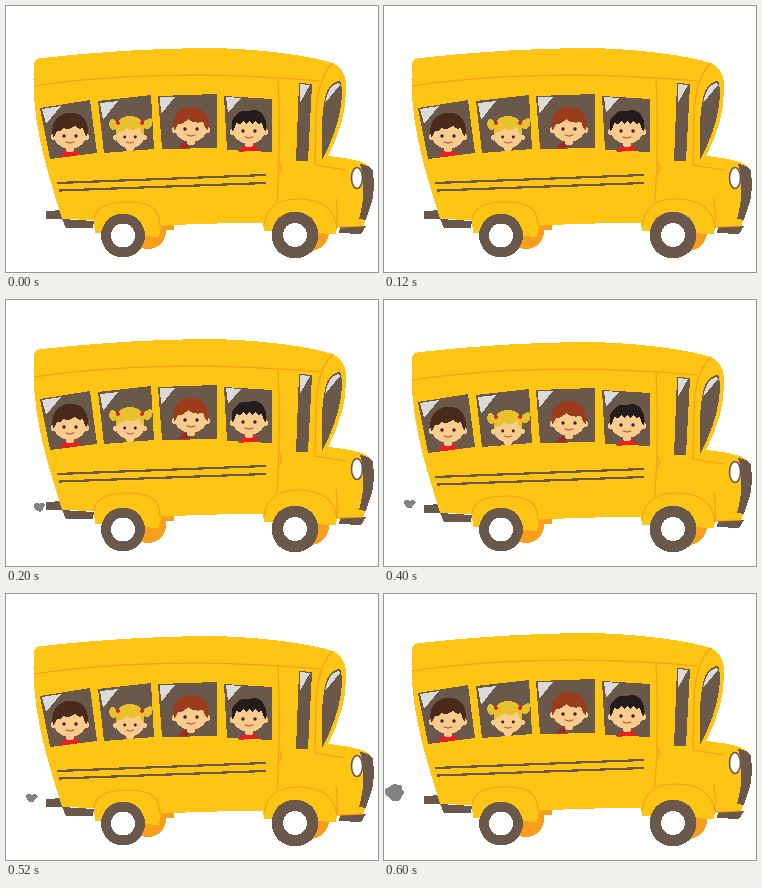
An HTML page without scripts that plays this animation: 372x266 px, repeating every 800 ms.

```html
<!DOCTYPE html>
<html lang="en">
<head>
<meta charset="utf-8">
<title>School bus</title>
<style>
html, body { margin: 0; width: 100%; height: 100%; overflow: hidden; background: #fff; }
svg { display: block; width: 100%; height: 100%; shape-rendering: crispEdges; }
.bus { animation: bounce 400ms step-end infinite; }
.puff { opacity: 0; fill: #808283; animation: puff 800ms step-end infinite; }
.p2 { animation-delay: 200ms; }
.p3 { animation-delay: 400ms; }
@keyframes bounce { 50% { transform: translateY(-3px); } }
@keyframes puff { 25% { opacity: 1; } 50% { opacity: 0; } }
.yellow { fill: #ffc515; }
.orange { fill: #f99d1c; }
.dark { fill: #6a584a; }
.glint { fill: #dadad8; }
.line { fill: none; stroke: #f99d1c; stroke-width: 1.2; }
.stripe { fill: none; stroke: #6a584a; stroke-width: 2.2; }
.skin { fill: #f9cb8c; }
.shirt { fill: #ee1c25; }
.blond { fill: #e8c22c; }
.mouth { fill: none; stroke: #a9412c; stroke-width: 1; stroke-linecap: round; }
.smooth { shape-rendering: geometricPrecision; }
</style>
</head>
<body>
<svg viewBox="0 0 372 266">
  <defs>
    <path id="shirt" class="shirt" d="M-10 22Q-8 16-3 15H4Q8 16 10 20Z"/>
    <g id="kid">
      <path class="skin" d="M-4 10H4V16Q0 19-4 16Z"/>
      <circle class="skin" cx="-16" cy="2" r="3.2"/>
      <circle class="skin" cx="16" cy="2" r="3.2"/>
      <ellipse class="skin" rx="16" ry="14"/>
      <g class="smooth" fill="#38231a">
        <circle cx="-6" cy="1" r="1.7"/>
        <circle cx="6" cy="1" r="1.7"/>
      </g>
      <path class="mouth smooth" d="M-4 7Q0 9.500 4 7"/>
    </g>
  </defs>

  <path class="puff" d="M28 204Q31 201 33 204Q36 201 39 204Q39 208 34 212Q27 210 28 204Z"/>
  <path class="puff p2" d="M20 201Q23 199 26 201Q30 199 32 202Q31 205 29 205Q28 209 24 208Q20 206 20 201Z"/>
  <path class="puff p3" d="M1 198Q1 193 6 193Q9 188 14 191Q18 190 18 195Q22 198 18 202Q16 208 11 207Q6 207 5 203Q1 202 1 198Z"/>

  <circle class="orange" cx="142" cy="225" r="18"/>
  <circle class="orange" cx="304" cy="226" r="19"/>

  <g class="bus">
    <path class="dark" d="M40 205L57 204V213L40 213Z"/>
    <path class="orange" d="M150 217H168V224H150Z"/>
    <path class="yellow" d="M28 58Q29 52 36 52C90 46 150 42 205 42C255 43 300 49 327 57Q338 62 340 76C341 103 335 125 322 150Q352 153 362 159Q368 168 367 183Q364 200 357 221H331L330 228L258 225L257 217Q210 217 168 219L155 220L153 231L89 227L88 214L56 213C45 175 24 120 28 58Z"/>
    <path class="dark" d="M56 213L88 215L87 222L60 222Z"/>
    <path class="dark" d="M334 221L360 220L355 228L333 227Z"/>
    <path class="dark" d="M354 158Q364 159 367 165Q369 185 366 195L360 214L353 213Q358 195 357 180Q358 168 354 158Z"/>
    <ellipse class="smooth" cx="351" cy="172" rx="5.500" ry="10.500" fill="#fff" stroke="#6a584a" stroke-width="1.600"/>

    <g class="smooth">
      <path class="line" d="M28 80C110 68 210 66 314 75M272 73Q275 130 271 196"/>
      <path class="line" d="M327 57Q311 72 310 110L309 159L340 164M273 156Q278 162 273 168"/>
      <path class="line" d="M88 214C89 201 102 196 122 196C142 196 154 201 154 220H168"/>
      <path class="line" d="M258 220C260 202 270 193 291 193C315 193 329 202 331 222M330 192Q332 207 331 221L357 220"/>
    </g>
    <path class="stripe" d="M51 177L260 169M53 184.500L260 177"/>

    <g class="dark">
      <path d="M34 102L84 94L91 147L44 153Z"/>
      <path d="M92 95L145 89L148 143L98 147Z"/>
      <path d="M152 90L211 88V142L156 143Z"/>
      <path d="M218 90L266 93V146L221 144Z"/>
      <path d="M293 77L306 78L302 155L290 155Z"/>
      <path d="M316 154Q314 105 321 85Q326 75 334 75Q337 80 335 100Q331 126 316 154Z"/>
    </g>
    <path class="glint" d="M36 103L55 100L40 118ZM94 97L112 95L97 114ZM154 91H169L155 108ZM220 91L235 92L222 107ZM294 78L304 79L294 97ZM319 97Q323 78 333 77L334 79Z"/>

    <g transform="translate(64 129)">
      <use href="#shirt"/>
      <use href="#kid"/>
      <path fill="#4a2a1b" d="M-17 2Q-20-12-10-19Q-1-25 10-20Q20-14 17 2Q14-1 13-7Q8-5 5-9Q-2-4-6-7Q-9-3-13-4Q-14 0-17 2Z"/>
    </g>
    <g transform="translate(124 130)">
      <g class="blond">
        <path d="M-11-11Q-17-20-20-16Q-22-10-18-6Q-13-6-11-11Z"/>
        <path d="M11-11Q18-20 22-17Q23-10 19-7Q14-6 11-11Z"/>
      </g>
      <use href="#kid" transform="scale(.88)"/>
      <path class="blond" d="M-14 0Q-17-19 0-20Q17-19 14 0Q11-3 9-9Q3-3-4-8Q-8-3-11-4Z"/>
      <g class="shirt">
        <circle cx="-12" cy="-13" r="1.700"/>
        <circle cx="12" cy="-13" r="1.700"/>
      </g>
    </g>
    <g transform="translate(185 122)">
      <path fill="#a02a20" d="M-13 20Q-10 14-3 14V20Z"/>
      <use href="#kid"/>
      <path fill="#9b3c1c" d="M-17 3Q-20-13-9-19Q2-24 12-17Q20-9 17 3Q14 0 12-6Q3-4-3-9Q-8-3-13-4Q-15 0-17 3Z"/>
    </g>
    <g transform="translate(243 124)">
      <use href="#shirt"/>
      <use href="#kid"/>
      <path fill="#231c1b" d="M-17 1Q-19-10-13-15Q-7-21 0-19Q9-22 14-15Q19-8 17 1Q14-1 13-7L9-6L6-9L3-6L0-9L-3-6L-6-9L-9-6L-13-7Q-14 0-17 1Z"/>
    </g>
  </g>

  <g class="dark">
    <circle cx="117" cy="229.500" r="22"/>
    <circle cx="289" cy="229" r="23.500"/>
  </g>
  <g fill="#fff">
    <circle cx="117" cy="229.500" r="12"/>
    <circle cx="289" cy="229" r="12"/>
  </g>
</svg>
</body>
</html>
```
